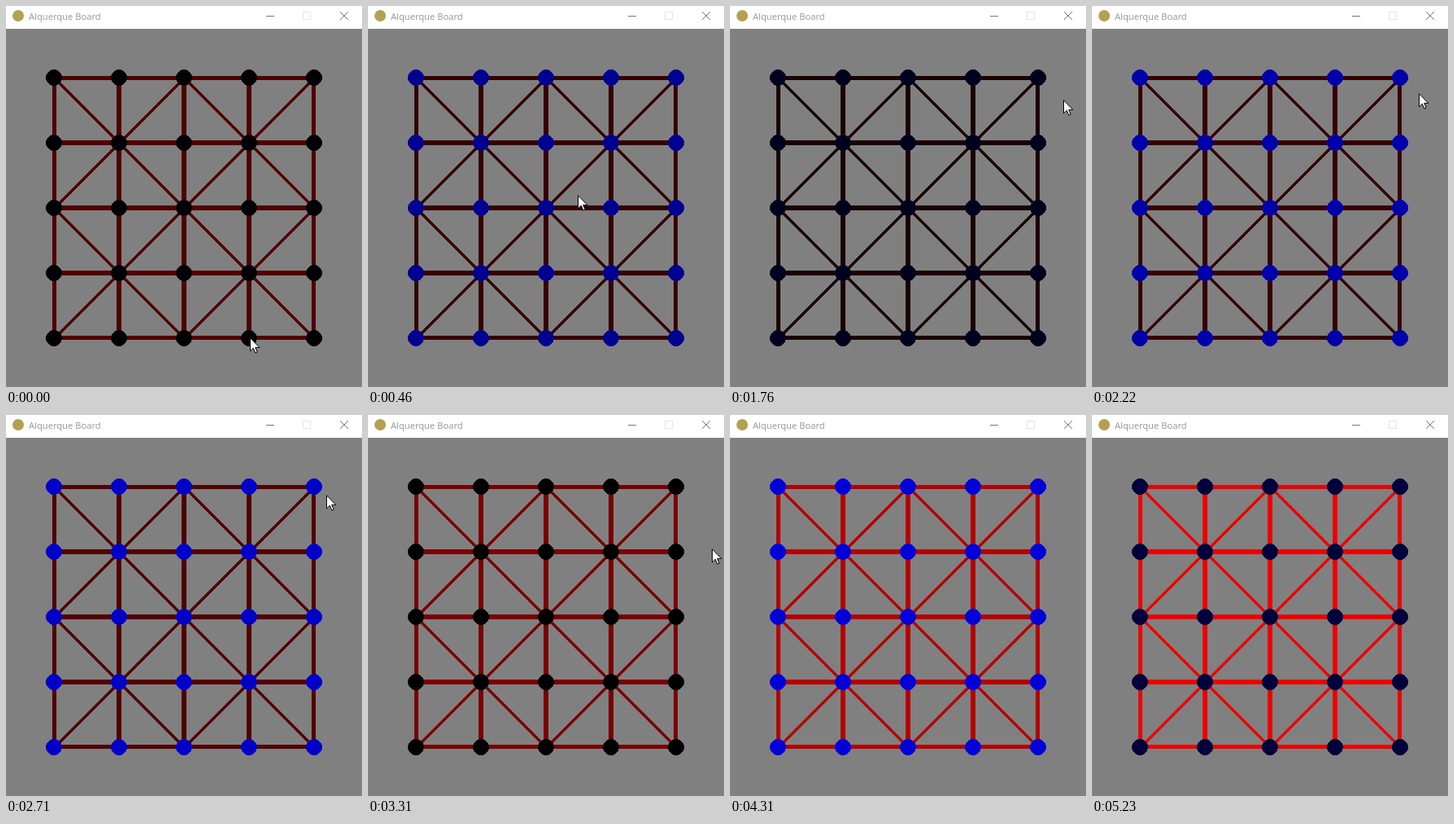
An HTML page that plays this animation: 438x468 px, repeating every 5310 ms.

```html
<!DOCTYPE html>
<html lang="en">
<head>
<meta charset="utf-8">
<title>Alquerque Board</title>
<style>
html, body { margin: 0; width: 100%; height: 100%; overflow: hidden; background: #808080; }
svg { display: block; }
text { font: 11.2px "Open Sans", "Noto Sans", sans-serif; fill: #959595; }
</style>
</head>
<body>
<svg width="438" height="468" viewBox="0 0 438 468">
  <rect width="438" height="468" fill="#808080"/>
  <rect width="438" height="28" fill="#fff"/>
  <circle cx="15" cy="12" r="7" fill="#b3a052"/>
  <text x="28" y="17">Alquerque Board</text>
  <g fill="none" stroke="#777">
    <path d="M320 12.5H330"/>
    <rect x="365.5" y="7.5" width="9" height="9" stroke="#e4e4e4"/>
    <path d="M411 7L421 17M421 7L411 17"/>
  </g>
  <g shape-rendering="crispEdges">
    <g id="lines" fill="none">
      <path id="cells" stroke-width="5"/>
      <path id="diagonals" stroke-width="3.5"/>
    </g>
    <g id="dots"></g>
  </g>
  <path id="cursor" d="M-.5 .8V16.9L3.3 13.2L5.9 19.1L8.2 18.1L5.7 12.4H10.8Z" fill="#fff" stroke="#000"/>
</svg>
<script>
const LOOP = 5310, STEPS = 69, CELL = 80, LEFT = 59, TOP = 88;
const $ = id => document.getElementById(id);

// Key points: step, value(s)
const ticks = [[0, -81.4], [35, 82], [43, 122], [69, 240.6]];
const moves = [
  [0, 301, 407], [8, 245, 173], [13, 245, 173], [19, 411, 115],
  [23, 411, 115], [35, 395, 98], [43, 424, 164], [50, 350, 428]
];

function at(keys, step) {
  const i = keys.findIndex(k => k[0] > step);
  if (i < 0) return keys[keys.length - 1].slice(1);
  const [t0, ...from] = keys[i - 1], [t1, ...to] = keys[i];
  return from.map((v, k) => v + (to[k] - v) * (step - t0) / (t1 - t0));
}

function build() {
  let cells = "", diagonals = "", dots = "";
  for (let r = 0; r < 5; r++) for (let c = 0; c < 5; c++) {
    const x = LEFT + c * CELL, y = TOP + r * CELL;
    dots += `<circle cx="${x}" cy="${y}" r="10"/>`;
    if (r === 4 || c === 4) continue;
    cells += `M${x + .5} ${y + .5}h79v79h-79z`;
    diagonals += (r + c) % 2
      ? `M${x + CELL + .5} ${y + .5}l-80 80`
      : `M${x + .5} ${y + .5}l80 80`;
  }
  $("cells").setAttribute("d", cells);
  $("diagonals").setAttribute("d", diagonals);
  $("dots").innerHTML = dots;
}

function draw(time) {
  // Repaint about 13 times a second, slightly early
  const step = Math.min(STEPS - 1, Math.floor((time + 14) * STEPS / LOOP));
  const tick = Math.round(at(ticks, step)[0]);
  // Red moves 1 per tick; blue bounces by 5 per tick
  const phase = (tick + 82) % 102;
  const blue = 5 * Math.min(phase, 102 - phase);
  $("lines").setAttribute("stroke", `rgb(${Math.abs(tick)},0,0)`);
  $("dots").setAttribute("fill", `rgb(0,0,${blue})`);

  const [x, y] = at(moves, step).map(Math.round);
  $("cursor").setAttribute("transform", `translate(${x} ${y})`);
  $("cursor").setAttribute("visibility", step <= 50 ? "visible" : "hidden");
}

build();
const start = performance.now();
function frame() {
  draw((performance.now() - start) % LOOP);
  requestAnimationFrame(frame);
}
frame();
</script>
</body>
</html>
```
